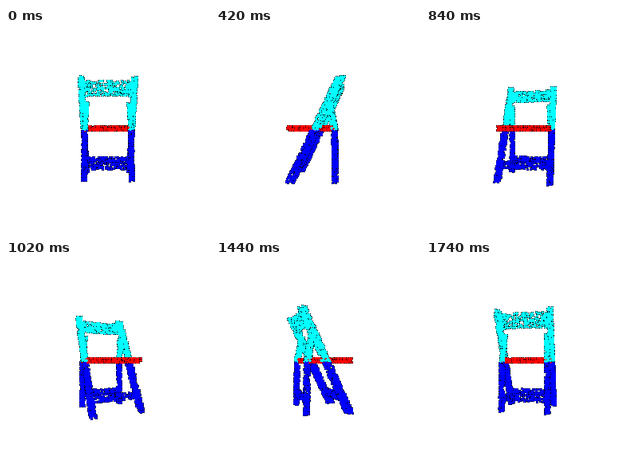
Animation, 256 px wide and 256 px high, one loop 1.8 s. Source, as a matplotlib script:

```python
import numpy as np
import matplotlib.pyplot as plt
from matplotlib.animation import FuncAnimation

SIZE, FRAMES, INTERVAL = 256, 30, 60
CENTER, EYE = 128, 240      # screen centre, camera distance
CYAN, RED, BLUE, BLACK = (0, 255, 255), (255, 0, 0), (0, 0, 255), (0, 0, 0)
LEAN = 0.48                 # depth gained per unit of height along a post

rng = np.random.default_rng(7)


def bar(a, b, u, v, density=0.24):
    """Random points on the sides and core of a bar from a to b, half sizes u and v."""
    a, b, u, v = (np.array(p, float) for p in (a, b, u, v))
    lu, lv = np.linalg.norm(u), np.linalg.norm(v)
    n = int(density * np.linalg.norm(b - a) * 4 * (lu + lv))
    t = rng.random((n, 1))
    free = rng.uniform(-1, 1, (n, 1))
    side = rng.choice([-1, 0, 1], (n, 1))
    along_u = rng.random((n, 1)) < lu / (lu + lv)
    p, q = np.where(along_u, free, side), np.where(along_u, side, free)
    return a + t * (b - a) + p * u + q * v


def crossbar(w, y, z, u, v, density=0.14):
    return bar((-w, y, z), (w, y, z), u, v, density)


def build_chair():
    parts = []
    for s in (-1, 1):
        parts.append(bar((s * 30, 59, 59 * LEAN), (s * 30, -59, -59 * LEAN),
                         (2.3, 0, 0), (0, 0, 4.6)))
        knee = (s * 26.5, 0, 21)
        parts.append(bar(knee, (s * 25.5, 32, 15), (2, 0, 0), (0, 0, 3)))
        parts.append(bar(knee, (s * 27, -58, 22), (2.2, 0, 0), (0, 0, 2.5)))
    back = crossbar(29, 46.5, 46.5 * LEAN, (0, 7.2, 7.2 * LEAN), (0, 0, 1.2))
    back[:, 2] += 5 * (1 - (back[:, 0] / 29) ** 2)
    parts.append(back)
    for w, z in ((28, -41 * LEAN), (26, 22)):
        parts.append(crossbar(w, -41, z, (0, 3.8, 0), (0, 0, 1.5)))
    frame = np.vstack(parts)
    seat = crossbar(29, 1.5, -6, (0, 2.3, 0), (0, 0, 26), 0.2)
    shade = np.where(frame[:, 1:2] >= 0, CYAN, BLUE)
    return np.vstack([frame, seat]), np.vstack([shade, np.tile(RED, (len(seat), 1))])


points, colors = build_chair()

# Each point is a small ball: a bright plus with dark corners set further back.
STAMP = [(dx, dy) for dx in (-1, 0, 1) for dy in (-1, 0, 1)]


def render(k):
    angle = 2 * np.pi * k / FRAMES
    c, s = np.cos(angle), np.sin(angle)
    x, y, z = points.T
    near = z * c - x * s
    scale = EYE / (EYE - near)
    px = np.floor(CENTER + (x * c + z * s) * scale).astype(int)
    py = np.floor(CENTER - y * scale).astype(int)

    cols, rows, depth, tint = [], [], [], []
    for dx, dy in STAMP:
        corner = dx * dy != 0
        cols.append(px + dx)
        rows.append(py + dy)
        depth.append(near - (7 if corner else 0.4 * abs(dx + dy)))
        tint.append(np.tile(BLACK, (len(px), 1)) if corner else colors)
    order = np.argsort(np.concatenate(depth))
    img = np.full((SIZE, SIZE, 3), 255, np.uint8)
    img[np.concatenate(rows)[order], np.concatenate(cols)[order]] = np.vstack(tint)[order]
    return img


fig = plt.figure(figsize=(SIZE / 100, SIZE / 100), dpi=100, facecolor="white")
ax = fig.add_axes([0, 0, 1, 1])
ax.axis("off")
view = ax.imshow(render(0), interpolation="nearest", aspect="auto")


def update(k):
    view.set_data(render(k))
    return [view]


anim = FuncAnimation(fig, update, frames=FRAMES, interval=INTERVAL,
                     repeat=True, repeat_delay=0, blit=False)
plt.show()
```
